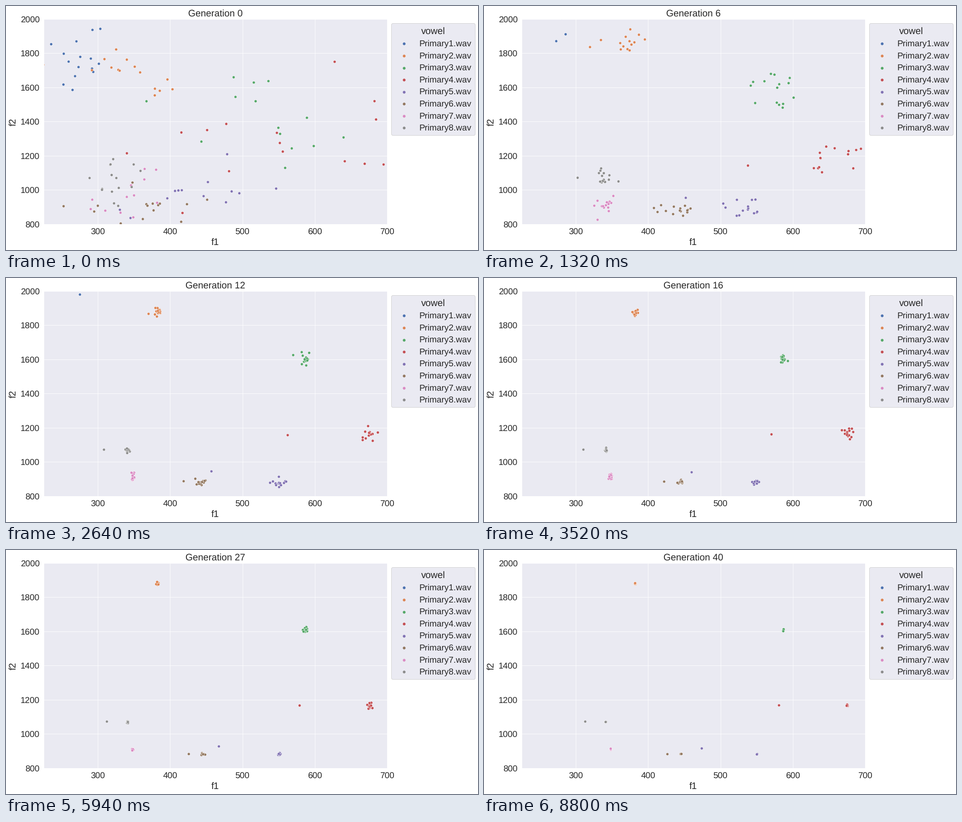
These frames come from a looping animation (1039x539 px, 9020 ms). A matplotlib script:

```python
import numpy as np
import matplotlib.pyplot as plt
from matplotlib.animation import FuncAnimation
from matplotlib.patches import FancyBboxPatch

W, H, DPI = 1039, 539, 64
GENERATIONS, INTERVAL = 41, 220
LEFT, RIGHT, TOP, BOTTOM = 83, 838.7, 28.5, 481.5
PANEL, INK = "#eaeaf2", "#262626"
SMALL, LARGE = 19.05, 20.78
POPULATION, RENEWAL = 15, 0.6

plt.rcParams.update({"font.family": "Liberation Sans", "text.hinting": "none"})

rng = np.random.default_rng(8)
colors, histories = [], []


def px(value):
    """Pixels to points."""
    return value * 72 / DPI


def approach(start, end, rate, generation):
    """Move from start to end, keeping `rate` of the gap per generation."""
    start, end = np.array(start), np.array(end)
    return end + (start - end) * rate ** generation


def breed(center, spread, tilt, generation):
    """Random points around a center; the cloud tightens with each generation."""
    tilt = tilt * 0.75 ** generation
    x, y = rng.normal(size=(2, POPULATION))
    cloud = np.column_stack([x, tilt * x + np.sqrt(1 - tilt ** 2) * y])
    residue = np.array([0.05, 0.12]) * (1 - generation / 45)
    return center + cloud * spread * (0.76 ** generation + residue)


def add_vowel(color, start, spread, tilt, end, stray=None):
    """Evolve one population in stage pixels; one point may stray."""
    points = np.zeros((POPULATION, 2))
    history = []
    for g in range(GENERATIONS):
        bred = breed(approach(start, end, 0.68, g), spread, tilt, g)
        renewed = (rng.random(POPULATION) < RENEWAL) | (g == 0)
        points = np.where(renewed[:, None], bred, points)
        if stray:
            points[0] = approach(*stray, g)
        history.append(points)
    colors.append(color)
    histories.append(history)


add_vowel("#4c72b0", (165, 120), (27, 42), 0.2, (167, -8),
          stray=((152, 155), (167, -10), 0.9))
add_vowel("#dd8452", (257, 137), (70, 40), 0.4, (333, 74))
add_vowel("#55a868", (575, 235), (110, 65), 0.5, (659, 177))
add_vowel("#c44e52", (571, 300), (140, 75), -0.2, (800, 343),
          stray=((491, 365), (650, 343), 0.87))
add_vowel("#8172b3", (417, 420), (115, 42), -0.65, (601, 451),
          stray=((435, 420), (515, 453), 0.98))
add_vowel("#937860", (345, 442), (85, 22), 0, (433, 451),
          stray=((335, 440), (404, 451), 0.87))
add_vowel("#da8bc3", (250, 427), (32, 40), -0.1, (279, 440))
add_vowel("#8c8c8c", (238, 372), (40, 22), 0, (268, 380),
          stray=((184, 380), (223, 379), 0.87))

population = np.concatenate(histories, axis=1)

fig = plt.figure(figsize=(W / DPI, H / DPI), dpi=DPI, facecolor="white")

# Full-stage layer in pixels for the labels and the legend.
stage = fig.add_axes([0, 0, 1, 1])
stage.set(xlim=(0, W), ylim=(H, 0))
stage.axis("off")


def label(x, y, text, size, **kwargs):
    return stage.text(x, y, text, fontsize=px(size), color=INK,
                      va="baseline", **kwargs)


title = label(461, 22.8, "", LARGE, ha="center")
label(460, 528.5, "f1", LARGE, ha="center")
label(22, 256, "f2", LARGE, ha="center", rotation=90, rotation_mode="anchor")

stage.add_patch(FancyBboxPatch(
    (848.5, 38.5), 184.5, 247.5, boxstyle="round,pad=0,rounding_size=3.8",
    facecolor=PANEL, edgecolor="#cccccc", linewidth=px(0.87)))
label(940, 61.3, "vowel", LARGE, ha="center")
for row, color in enumerate(colors):
    y = 83.4 + 26.57 * row
    stage.scatter(875.6, y, s=px(6.1) ** 2, color=color, linewidth=0)
    label(909, y + 5.8, f"Primary{row + 1}.wav", SMALL, ha="left")

ax = fig.add_axes([LEFT / W, 1 - BOTTOM / H, (RIGHT - LEFT) / W,
                   (BOTTOM - TOP) / H], facecolor=PANEL)
ax.set(xlim=(LEFT, RIGHT), ylim=(BOTTOM, TOP))
ax.set_xticks(202.3 + 159.1 * np.arange(5), 300 + 100 * np.arange(5))
ax.set_yticks(BOTTOM - 75.5 * np.arange(7), 800 + 200 * np.arange(7))
ax.tick_params(length=0, pad=px(9), labelsize=px(SMALL), labelcolor=INK)
ax.grid(color="white", linewidth=px(0.87))
ax.set_axisbelow(True)
for spine in ax.spines.values():
    spine.set(color="white", linewidth=px(1))

dots = ax.scatter(*population[0].T, s=px(5.9) ** 2,
                  c=np.repeat(colors, POPULATION),
                  edgecolors="white", linewidths=px(0.55), zorder=2.2)


def update(generation):
    dots.set_offsets(population[generation])
    title.set_text(f"Generation {generation}")
    return dots, title


animation = FuncAnimation(fig, update, frames=GENERATIONS, interval=INTERVAL,
                          repeat=True, repeat_delay=0)
plt.show()
```
